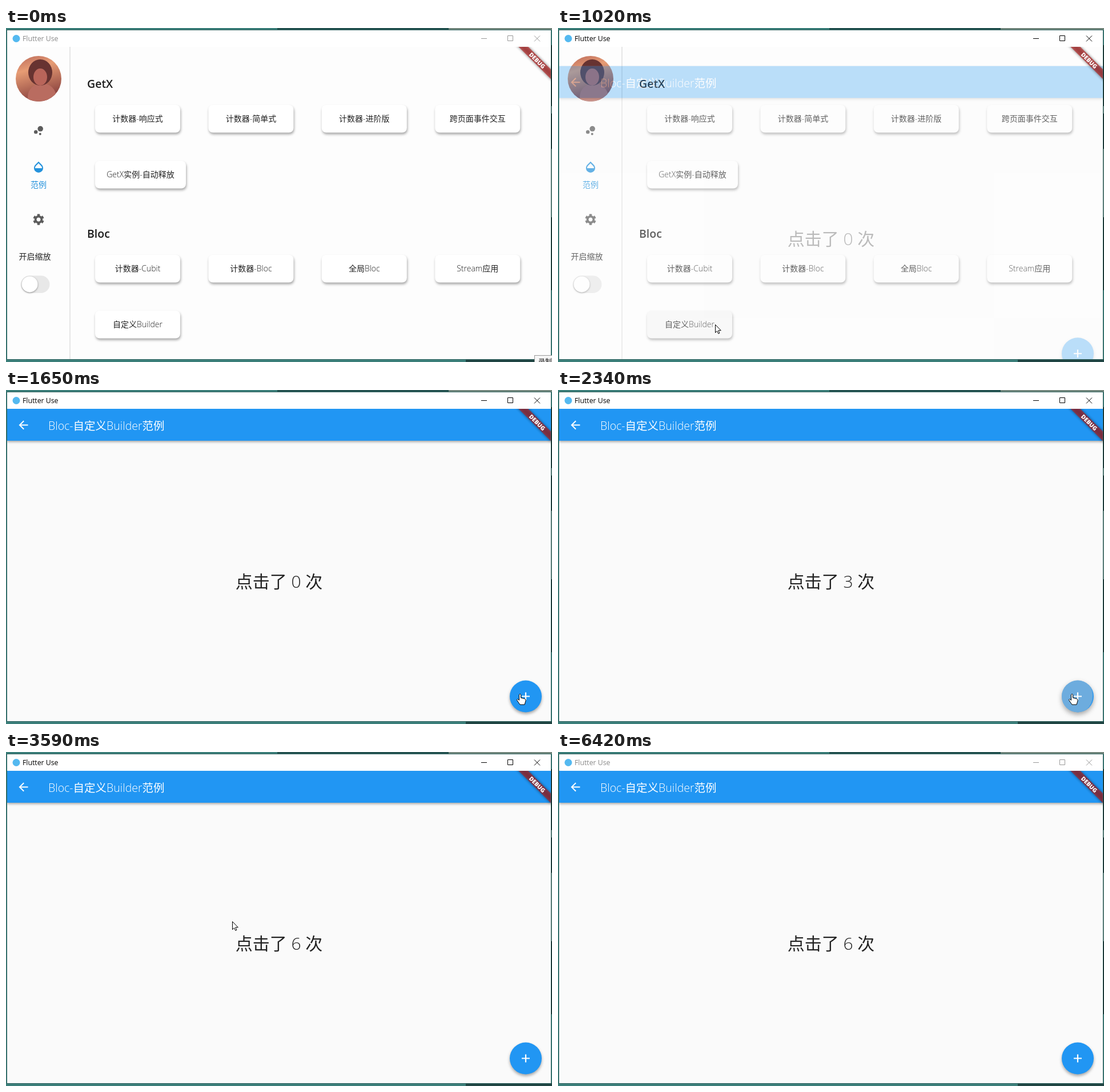
An HTML page for the animation above (6490 ms loop, 956 by 586 pixels).

```html
<!DOCTYPE html>
<html lang="zh-CN">
<head>
<meta charset="utf-8">
<title>Flutter Use</title>
<style>
html, body { margin: 0; width: 100%; height: 100%; overflow: hidden; background: #3c7f7a; }
svg { display: block; }
text { font: 300 14px "Open Sans", "Noto Sans", "Noto Sans CJK SC", "Noto Sans CJK JP", sans-serif; fill: #222; }
.mid { text-anchor: middle; }
.head { font-size: 19.5px; font-weight: 600; fill: #1c1c1c; }
.card { fill: #fff; filter: drop-shadow(1.5px 3px 2px rgba(0, 0, 0, .34)); }
.bar { fill: #2196f3; filter: drop-shadow(0 2px 2px rgba(0, 0, 0, .35)); }
.thumb { fill: #fff; filter: drop-shadow(0 1px 1.5px rgba(0, 0, 0, .4)); }
#caption { font-size: 12.3px; font-weight: 400; }
#barTitle { font-size: 19.5px; fill: #fff; }
#count { font-size: 30px; }
#debug text { font-size: 10.2px; font-weight: 800; fill: #fff; }
</style>
</head>
<body>
<svg width="956" height="586" viewBox="0 0 956 586">
  <defs>
    <clipPath id="client"><rect x="2" y="33" width="952" height="548"/></clipPath>
    <clipPath id="fabClip"><circle cx="910" cy="537.5" r="28"/></clipPath>
    <clipPath id="avatarClip"><circle cx="57" cy="89" r="40"/></clipPath>
    <linearGradient id="sunset" x2=".3" y2="1">
      <stop offset="0" stop-color="#b9685a"/>
      <stop offset=".35" stop-color="#e79c74"/>
      <stop offset="1" stop-color="#8c4440"/>
    </linearGradient>
    <filter id="soft" x="-50%" y="-100%" width="200%" height="300%"><feGaussianBlur stdDeviation="2.5"/></filter>
  </defs>

  <!-- desktop behind the window -->
  <rect width="956" height="586" fill="#3c7f7a"/>
  <rect x="475" width="300" height="4" fill="#24524f"/>
  <rect x="775" width="181" height="4" fill="#75897f"/>
  <rect x="805" y="581" width="151" height="5" fill="#214644"/>
  <path d="M955 30V137M955 150V212M955 332V460" stroke="#0c1414" stroke-width="2"/>
  <path d="M955 137V150M955 212V332" stroke="#7d918b" stroke-width="2"/>

  <!-- window frame -->
  <rect x="1.5" y="3.5" width="953" height="578" fill="#fff" stroke="#2e625f"/>
  <circle cx="18" cy="18.5" r="6.5" fill="#54b9f0"/>
  <text id="caption" x="29" y="23">Flutter Use</text>
  <path id="controls" d="M832 18.5h10M878.5 13.5h9v9h-9zM925 13.500l10 10M935 13.500l-10 10" fill="none"/>

  <g clip-path="url(#client)">
    <g id="home">
      <rect x="2" y="33" width="952" height="548" fill="#fdfdfd"/>
      <rect x="111" y="33" width="2" height="548" fill="#e6e6e6"/>
      <g clip-path="url(#avatarClip)">
        <rect x="17" y="49" width="80" height="80" fill="url(#sunset)"/>
        <ellipse cx="63" cy="121" rx="25" ry="24" fill="#b96c60"/>
        <ellipse cx="60" cy="78" rx="21" ry="23" fill="#673331"/>
        <ellipse cx="60" cy="86" rx="12" ry="15" fill="#b9655a"/>
      </g>
      <g fill="#5c5c5c">
        <circle cx="60.2" cy="176.8" r="4.8"/>
        <circle cx="52.2" cy="182.4" r="3.2"/>
        <circle cx="59.8" cy="186" r="2"/>
      </g>
      <path transform="translate(45 232)" fill="#2492dc" d="M17.66 8L12 2.35 6.34 8C4.78 9.56 4 11.64 4 13.64s.78 4.11 2.34 5.67 3.61 2.35 5.66 2.35 4.1-.79 5.66-2.35S20 15.64 20 13.64 19.22 9.56 17.66 8zM6 14c.01-2 .62-3.27 1.76-4.4L12 5.27l4.24 4.38C17.38 10.77 17.99 12 18 14H6z"/>
      <text class="mid" x="57" y="280" style="fill:#2492dc">范例</text>
      <g transform="translate(57 336)" fill="none" stroke="#5c5c5c">
        <circle r="5.4" stroke-width="3.800"/>
        <circle r="8.2" stroke-width="3" pathLength="60" stroke-dasharray="5.4 4.6" stroke-dashoffset="-2.300"/>
      </g>
      <text x="22.5" y="406">开启缩放</text>
      <rect x="26.500" y="434.500" width="50" height="30.500" rx="15.250" fill="#e8e8e8"/>
      <circle class="thumb" cx="41.5" cy="449.7" r="14"/>
      <text class="head" x="142" y="104.500">GetX</text>
      <text class="head" x="142" y="367.500">Bloc</text>
      <g id="cards"></g>
    </g>

    <g id="page">
      <rect x="2" y="33" width="952" height="548" fill="#fafafa"/>
      <rect class="bar" x="2" y="33" width="952" height="56"/>
      <path transform="translate(18.500 49.500)" fill="#fff" d="M20 11H7.83l5.59-5.59L12 4l-8 8 8 8 1.41-1.41L7.83 13H20z"/>
      <text id="barTitle" x="74" y="70">Bloc-自定义Builder范例</text>
      <text id="count" class="mid" x="478" y="347"></text>
      <circle id="fab" cx="910" cy="537.5" r="28" fill="#2196f3"/>
      <g clip-path="url(#fabClip)" fill="#c4c4c4">
        <circle id="glow" cx="910" cy="537.5" r="28"/>
        <circle id="splash" cx="902" cy="536"/>
      </g>
      <path d="M903 537.5h14M910 530.5v14" stroke="#fff" stroke-width="2.200"/>
    </g>

    <g id="debug" transform="translate(954 33) rotate(45)">
      <rect x="-60" y="28" width="120" height="12" opacity=".5" filter="url(#soft)"/>
      <rect x="-60" y="28" width="120" height="12" fill="#b71c1c" fill-opacity=".627"/>
      <text class="mid" y="37.700">DEBUG</text>
    </g>
  </g>

  <g id="hint">
    <rect x="925.5" y="574.5" width="40" height="20" fill="#f6f6f6" stroke="#9a9a9a"/>
    <text x="932" y="590" style="font-size:12px">录制</text>
  </g>

  <g id="cursor" fill="#fff" stroke="#000" stroke-linejoin="round">
    <path id="arrow" d="M.5.5V14.500L3.600 11.600 5.800 16.300 7.900 15.300 5.800 10.700H10.300z"/>
    <path id="hand" d="M-1.5 1.500Q0-1 1.500 1.500V7l6 1.500q3 .8 2.600 3.500l-1.200 4-.9 3h-8L-4.800 12q-1.500-2 .2-2.600 1.200-.3 3.100 2z"/>
  </g>
</svg>
<script>
const LOOP = 6490, STEP = 69;
const PUSH_START = 890, PUSH_TIME = 300;
const FOCUS_ON = 800, FOCUS_OFF = 6400;
const CLICKS = Array.from({ length: 6 }, (_, i) => 1870 + 220 * i);
const PRESS = 120, FADE = 230;

// time, x, y of the pointer tip
const ROUTE = [
  [69, 935, 570], [483, 285, 527], [621, 260, 524], [900, 262, 523], [1035, 275, 520],
  [1173, 446, 479], [1311, 790, 515], [1400, 900, 533], [3330, 900, 533], [3588, 396, 297],
  [3726, 365, 288], [4002, 565, 286], [4485, 130, 47], [4692, 99, 53], [4900, 90, 54],
  [5037, 97, 52], [5175, 105, 55], [5382, 319, 123], [5870, 808, 582]
];

const $ = id => document.getElementById(id);
const clamp = v => Math.min(1, Math.max(0, v));
const mix = (a, b, p) => a + (b - a) * p;

function bezier(x1, y1, x2, y2) {
  const at = (a, b, s) => 3 * a * s * (1 - s) ** 2 + 3 * b * s * s * (1 - s) + s ** 3;
  return x => {
    let low = 0, high = 1;
    for (let i = 0; i < 24; i++) {
      const s = (low + high) / 2;
      if (at(x1, x2, s) < x) low = s; else high = s;
    }
    return at(y1, y2, high);
  };
}
const easeIn = bezier(.42, 0, 1, 1);
const fastOutSlowIn = bezier(.4, 0, .2, 1);

const ROWS = [
  [135, ['计数器-响应式', '计数器-简单式', '计数器-进阶版', '跨页面事件交互']],
  [233, ['GetX实例-自动释放']],
  [398, ['计数器-Cubit', '计数器-Bloc', '全局Bloc', 'Stream应用']],
  [496, ['自定义Builder']]
];
$('cards').innerHTML = ROWS.map(([y, labels]) => labels.map((label, i) => {
  const x = 156 + 198.4 * i, width = label.startsWith('GetX') ? 159 : 149;
  return `<rect class="card" x="${x}" y="${y}" width="${width}" height="48.5" rx="8"/>
    <text class="mid" x="${x + width / 2}" y="${y + 29}">${label}</text>`;
}).join('')).join('');
const pressedCard = $('cards').querySelector('rect:nth-last-of-type(1)');

function drawWindow(t) {
  const active = t >= FOCUS_ON && t < FOCUS_OFF;
  $('caption').style.fill = active ? '#000' : '#8a8a8a';
  $('controls').setAttribute('stroke', active ? '#000' : '#999');
  pressedCard.style.fill = active ? '#f6f6f6' : '#fff';
  $('hint').style.display = t < STEP ? '' : 'none';
}

function drawPage(t) {
  const p = clamp((t - PUSH_START) / PUSH_TIME);
  $('page').setAttribute('opacity', p < 1 ? easeIn(p) : 1);
  $('page').setAttribute('transform', `translate(0 ${137 * (1 - fastOutSlowIn(p))})`);
  $('page').style.display = p > 0 ? '' : 'none';
  $('count').textContent = `点击了 ${CLICKS.filter(c => c <= t).length} 次`;
}

function drawFab(t) {
  const click = CLICKS.filter(c => c - PRESS <= t).pop() ?? Infinity;
  const age = t - (click - PRESS);
  const ink = age >= 0 ? clamp(1 - (t - click) / FADE) : 0;
  const lift = ink * clamp(age / 70);
  $('glow').setAttribute('opacity', .15 * lift);
  $('splash').setAttribute('opacity', .46 * ink);
  $('splash').setAttribute('r', ink ? 6 + age * .18 : 0);
  $('fab').style.filter = `drop-shadow(0 ${mix(3, 5, lift)}px ${mix(2.5, 4.5, lift)}px rgba(0,0,0,.34))`;
}

function drawCursor(t) {
  const next = ROUTE.findIndex(key => key[0] > t);
  $('cursor').style.display = next > 0 ? '' : 'none';
  if (next < 1) return;
  const [t0, x0, y0] = ROUTE[next - 1], [t1, x1, y1] = ROUTE[next];
  const p = (t - t0) / (t1 - t0), x = mix(x0, x1, p), y = mix(y0, y1, p);
  $('cursor').setAttribute('transform', `translate(${Math.round(x)} ${Math.round(y)})`);
  const onFab = t > PUSH_START && Math.hypot(x - 910, y - 537.5) < 28;
  $('arrow').style.display = onFab ? 'none' : '';
  $('hand').style.display = onFab ? '' : 'none';
}

function frame() {
  const t = Math.floor(performance.now() % LOOP / STEP + .25) * STEP;
  drawWindow(t);
  drawPage(t);
  drawFab(t);
  drawCursor(t);
  requestAnimationFrame(frame);
}
frame();
</script>
</body>
</html>
```
